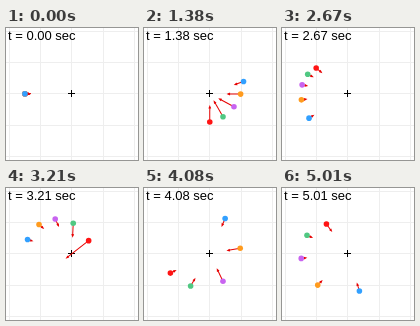
Write an HTML page with a canvas that moves like this. It is 132 by 132 pixels and loops after 5040 ms.

```html
<!DOCTYPE html>
<html>
<head>
<meta charset="utf-8">
<style>
html, body { margin: 0; width: 132px; height: 132px; overflow: hidden; background: #fff; }
canvas { display: block; }
</style>
</head>
<body>
<canvas id="stage" width="132" height="132"></canvas>
<script>
const ctx = document.getElementById('stage').getContext('2d');
const LOOP = 5040, STEP = 30;
const C = 65.8, UNIT = 31.25;        // centre and pixels per length unit
const GM = 10, START = 1.5;          // gravity and launch distance
const ARROW = 1.37;                  // pixels per unit of acceleration

// Bodies share a launch point but differ in launch speed.
const bodies = [
  [2.0, '#ff1414'],
  [2.1, '#50c882'],
  [2.2, '#c864f0'],
  [2.3, '#ff9b1e'],
  [2.4, '#32a0ff']
].map(([speed, color]) => {
  const e = 1 - speed * speed * START / GM;
  const a = START / (1 + e);
  return { color, e, a, b: a * Math.sqrt(1 - e * e), rate: Math.sqrt(GM / a ** 3) };
});

// Solves Kepler's equation, starting at the far end of the orbit.
function position({ e, a, b, rate }, t) {
  const M = Math.PI + rate * t;
  let E = M;
  for (let i = 0; i < 8; i++) E -= (E - e * Math.sin(E) - M) / (1 - e * Math.cos(E));
  return [a * (Math.cos(E) - e), b * Math.sin(E)];
}

function line(x1, y1, x2, y2, color) {
  ctx.strokeStyle = color;
  ctx.beginPath();
  ctx.moveTo(x1, y1);
  ctx.lineTo(x2, y2);
  ctx.stroke();
}

function arrow(x, y, angle, length) {
  ctx.save();
  ctx.translate(x, y);
  ctx.rotate(angle);
  line(0, 0, length - 2, 0, '#e60000');
  ctx.fillStyle = '#e60000';
  ctx.beginPath();
  ctx.moveTo(length, 0);
  ctx.lineTo(length - 3.5, -1.4);
  ctx.lineTo(length - 3.5, 1.4);
  ctx.fill();
  ctx.restore();
}

function drawBody(body, t) {
  const [x, y] = position(body, t);
  const px = C + x * UNIT, py = C + y * UNIT;
  arrow(px, py, Math.atan2(-y, -x), ARROW * GM / (x * x + y * y));
  ctx.fillStyle = body.color;
  ctx.beginPath();
  ctx.arc(px, py, 2.8, 0, 2 * Math.PI);
  ctx.fill();
}

const snap = v => Math.floor(v) + 0.5;

function draw(t) {
  ctx.fillStyle = '#fff';
  ctx.fillRect(0, 0, 132, 132);
  ctx.lineWidth = 1;
  for (let i = -2; i <= 2; i++) {
    const p = snap(C + i * UNIT);
    line(p, 0, p, 132, '#eee');
    line(0, p, 132, p, '#eee');
  }
  const c = snap(C);
  line(c - 3.5, c, c + 3.5, c, '#000');
  line(c, c - 3.5, c, c + 3.5, '#000');
  bodies.forEach(body => drawBody(body, t));
  ctx.fillStyle = '#000';
  ctx.font = '13px "Liberation Sans", Arial, sans-serif';
  ctx.fillText(`t = ${t.toFixed(2)} sec`, 2, 12);
}

const begin = performance.now();
function tick() {
  const ms = (performance.now() - begin) % LOOP;
  draw(Math.floor(ms / STEP) * STEP / 1000);
  requestAnimationFrame(tick);
}
tick();
</script>
</body>
</html>
```
